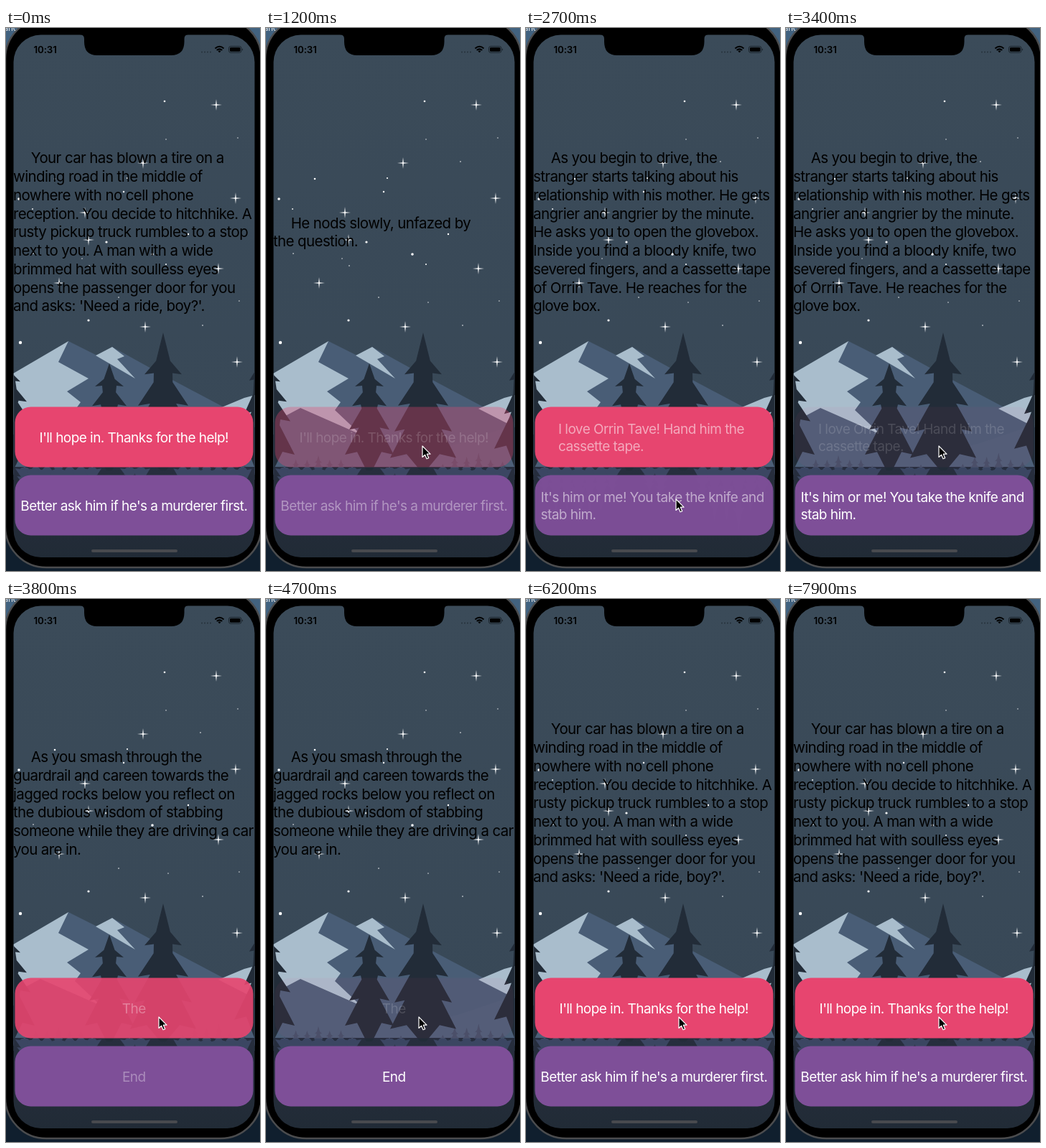
These frames come from a looping animation (354x756 px, 8400 ms). An HTML page:

```html
<!DOCTYPE html>
<html lang="en">
<head>
<meta charset="utf-8">
<title>Hitchhike story</title>
<style>
  html, body { margin: 0; width: 100%; height: 100%; overflow: hidden; background: #101a26; }
  svg { display: block; width: 354px; height: 756px; }
  text { font-family: Inter, Roboto, sans-serif; font-optical-sizing: none; }
  .story { font-size: 20.5px; letter-spacing: -.61px; }
  .title { font-size: 19px; letter-spacing: -.55px; fill: #fff; }
</style>
</head>
<body>
<svg viewBox="0 0 354 756">
  <defs>
    <clipPath id="screen"><rect x="10.5" y="9.5" width="336" height="727.5" rx="38"/></clipPath>
    <linearGradient id="sky" x2="0" y2="1">
      <stop stop-color="#3b4b59"/><stop offset="1" stop-color="#384857"/>
    </linearGradient>
    <linearGradient id="lake" x2="0" y2="1">
      <stop stop-color="#272e3e"/><stop offset="1" stop-color="#212b36"/>
    </linearGradient>
  </defs>

  <rect width="354" height="756" fill="#101f2e"/>
  <rect width="354" height="40" fill="#42627f"/>
  <text x="-3" y="4" font-size="11" fill="#eee">anc</text>
  <rect x="-1" y="-14" width="357" height="765" rx="57" stroke="#4b4c4e" stroke-width="2.500"/>

  <g clip-path="url(#screen)">
    <rect x="10" y="9" width="338" height="620" fill="url(#sky)"/>
    <g id="stars" fill="#fff"></g>
    <path fill="#495d76" d="M87 436L137 461L148 444L215 481L300 526L347 552V620H10V500Z"/>
    <path fill="#a9bdcc" d="M10 481L87 436L73 465L115 488L85 506L104 521L96 532L132 566H10Z
      M125 456L148 444L165 457L155 461L180 488ZM296 530L332 515L347 511V556Z"/>
    <path fill="#4c5f78" d="M10 549L48 529L132 566L180 600L270 578L347 552V622H10Z"/>
    <rect x="10" y="611" width="338" height="128" fill="url(#lake)"/>
    <g id="grove" fill="#425068"></g>
    <g id="mirror" fill="#3b4662"></g>
    <g id="trees" fill="#222c38"></g>
    <g id="stories"></g>
    <g id="buttons"></g>
    <rect x="119" y="726" width="120" height="4" rx="2" fill="#484a4e"/>
  </g>

  <path d="M103 9Q109 9.500 109 15V19Q109 38 127 38H230Q248.500 38 248.500 19V15Q248.500 9.500 254 9Z"/>
  <text x="38.500" y="35" font-size="13.300" font-weight="600" letter-spacing="-.1">10:31</text>
  <g fill="#26313b">
    <circle cx="273" cy="33.500" r="1"/><circle cx="277" cy="33.500" r="1"/>
    <circle cx="281" cy="33.500" r="1"/><circle cx="285" cy="33.500" r="1"/>
  </g>
  <g fill="none" stroke="#000" stroke-width="2">
    <path d="M291.500 28.500Q297.500 23 303.500 28.500M293.800 31Q297.500 27.800 301.200 31"/>
    <path d="M296 32L297.500 34L299 32Z" stroke-width="1" fill="#000"/>
  </g>
  <rect x="310.500" y="25.500" width="17.500" height="8.800" rx="2.600" fill="none" stroke="#1b242c"/>
  <rect x="312" y="27" width="14.500" height="5.800" rx="1.400"/>
  <path d="M329.500 28.500Q331 30 329.500 31.500Z"/>

  <path id="cursor" d="M0 0V15.500L3.600 12.200L6 17.800L8.700 16.600L6.300 11.200H11Z"
    stroke="#fff" stroke-width="1.200" stroke-linejoin="round"/>
</svg>

<script>
const LOOP = 8400, STEP = 100;
const byId = id => document.getElementById(id);

function add(parent, tag, attrs, text) {
  const node = document.createElementNS("http://www.w3.org/2000/svg", tag);
  for (const key in attrs) node.setAttribute(key, attrs[key]);
  if (text) node.textContent = text;
  return parent.appendChild(node);
}

// Scenery
const sparkles = [[293,107],[191,188],[320,237],[110,257],[115,295],[296,335],[74,355],[194,416],[322,465]];
const dots = [[221,102,1.3],[223,155,.7],[323,153,.7],[271,186,.8],[68,210,1.3],[169,209,1.1],
  [18,238,1.8],[164,228,1.2],[37,252,.9],[140,298,1.6],[254,287,1.2],[38,314,.8],[106,321,.7],
  [116,331,.8],[204,315,1.8],[223,329,1],[157,375,.8],[226,382,.7],[325,380,.7],[115,407,1.6],
  [274,414,.8],[20,438,2.2]];
for (const [x, y] of sparkles)
  add(byId("stars"), "path", { d: `M${x} ${y - 8}l.8 7.200 7.200 .8-7.200 .8-.8 7.200-.8-7.200-7.200-.8 7.200-.8Z` });
for (const [cx, cy, r] of dots) add(byId("stars"), "circle", { cx, cy, r });

// Tiers are [bottom y, half width]; each tier tucks in before the next one.
function tree(parent, x, tip, tiers, foot = tiers[tiers.length - 1][0]) {
  const side = [];
  for (const [y, w] of tiers) {
    const rise = (y - tip) * .06;
    side.push([w * .38, y - (y - tip) * .34], [w, y - rise / 2], [w * .5, y - rise]);
  }
  side.push([4, foot]);
  const right = side.map(([w, y]) => `${x + w},${y}`);
  const left = side.map(([w, y]) => `${x - w},${y}`).reverse();
  add(parent, "polygon", { points: [`${x},${tip}`, ...right, ...left].join(" ") });
}

function conifer(parent, x, tip, height, w) {
  tree(parent, x, tip, [.4, .7, 1].map(k => [tip + height * k, w * (.4 + .6 * k)]));
}

// A clump of small trees on the shore and its taller image in the water.
function clump(from, to, count, depth) {
  for (let i = 0; i < count; i++) {
    const u = (i + .5) / count, x = from + (to - from) * u;
    const h = depth * (.45 + .55 * Math.sin(Math.PI * u)) * (i % 2 ? 1 : .82);
    conifer(byId("grove"), x, 622 - h * .34, h * .34, 8);
    conifer(byId("mirror"), x, 612 + h, -h, 13);
  }
}
clump(18, 128, 7, 80);
clump(164, 196, 2, 50);
clump(238, 338, 6, 92);

const trees = byId("trees");
tree(trees, 144, 467, [[500, 20], [528, 24], [562, 28], [598, 34]], 616);
tree(trees, 219, 424, [[484, 26], [529, 35], [566, 40], [604, 46]], 616);
tree(trees, 6, 466, [[493, 14], [522, 23], [550, 28], [598, 34]], 616);
tree(trees, 352, 450, [[492, 13], [540, 20], [590, 34]], 616);

// Story
const scenes = [
  { story: ["Your car has blown a tire on a", "winding road in the middle of",
      "nowhere with no cell phone", "reception. You decide to hitchhike. A",
      "rusty pickup truck rumbles to a stop", "next to you. A man with a wide",
      "brimmed hat with soulless eyes", "opens the passenger door for you",
      "and asks: 'Need a ride, boy?'."],
    titles: [["I'll hope in. Thanks for the help!"], ["Better ask him if he's a murderer first."]] },
  { story: ["He nods slowly, unfazed by", "the question."],
    titles: [["At least he's honest. I'll climb in."], ["Wait, I know how to change a tire."]] },
  { story: ["As you begin to drive, the", "stranger starts talking about his",
      "relationship with his mother. He gets", "angrier and angrier by the minute.",
      "He asks you to open the glovebox.", "Inside you find a bloody knife, two",
      "severed fingers, and a cassette tape", "of Orrin Tave. He reaches for the", "glove box."],
    titles: [["I love Orrin Tave! Hand him the", "cassette tape."],
      ["It's him or me! You take the knife and", "stab him."]] },
  { story: ["As you smash through the", "guardrail and careen towards the",
      "jagged rocks below you reflect on", "the dubious wisdom of stabbing",
      "someone while they are driving a car", "you are in."],
    titles: [["The"], ["End"]] }
];
const buttons = [
  { y: 527.5, color: "#e7456f", left: 45 },
  { y: 622.5, color: "#7e4f98", left: 20.5 }
];

for (const button of buttons) {
  button.plate = add(byId("buttons"), "rect",
    { x: 12.5, y: button.y, width: 332, height: 84, rx: 22, fill: button.color });
}

function lines(parent, list, middle, gap, place) {
  list.forEach((line, i) => add(parent, "text",
    { y: middle + (i - (list.length - 1) / 2) * gap, ...place(i) }, line));
}

for (const scene of scenes) {
  scene.text = add(byId("stories"), "g", { class: "story" });
  lines(scene.text, scene.story, 291.4, 25.75, i => ({ x: i ? 10 : 34.7 }));
  scene.labels = scene.titles.map((title, b) => {
    const label = add(byId("buttons"), "g", { class: "title" });
    const place = title.length > 1 ? { x: buttons[b].left } : { x: 178.3, "text-anchor": "middle" };
    lines(label, title, buttons[b].y + 49.5, 24, () => place);
    return label;
  });
}

// Timeline
const taps = [
  { button: 0, down: 500, up: 1140 },
  { button: 1, down: 2200, up: 2420 },
  { button: 0, down: 3400, up: 3590 },
  { button: 0, down: 4700, up: 4860 }
];
const route = [[100, 345, 730], [500, 218, 582], [1500, 218, 582], [2000, 209, 656],
  [2750, 209, 656], [3100, 213, 582], [LOOP, 213, 582]];

const clamp = v => Math.min(1, Math.max(0, v));
const smooth = u => u * u * (3 - 2 * u);

function pointer(t) {
  const i = Math.max(1, route.findIndex(stop => stop[0] > t));
  const [t0, x0, y0] = route[i - 1], [t1, x1, y1] = route[i];
  const u = smooth(clamp((t - t0) / (t1 - t0)));
  return [x0 + (x1 - x0) * u, y0 + (y1 - y0) * u];
}

function plateAlpha(index, t) {
  const tap = taps.filter(p => p.button === index && p.down <= t).pop();
  if (!tap) return 1;
  return t < tap.up ? .05 : 1 - .95 * Math.exp(-(((t - tap.up) / 120) ** 1.5));
}

function draw(t) {
  const done = taps.filter(tap => tap.up <= t).length;
  const current = done % scenes.length;
  const since = done ? t - taps[done - 1].up : Infinity;
  const fadingOut = since < 100;
  const shown = fadingOut ? done - 1 : current;
  const fade = fadingOut ? 1 - since / 100 : 1 - (1 - clamp((since - 100) / 450)) ** 1.5;
  const plates = buttons.map((_, b) => plateAlpha(b, t));

  buttons.forEach((button, b) => button.plate.setAttribute("opacity", plates[b]));
  scenes.forEach((scene, s) => {
    scene.text.setAttribute("visibility", s === current ? "visible" : "hidden");
    scene.labels.forEach((label, b) =>
      label.setAttribute("opacity", s === shown ? fade * (.1 + .9 * plates[b]) : 0));
  });
  const [x, y] = pointer(t);
  byId("cursor").setAttribute("transform", `translate(${x} ${y})`);
  byId("cursor").setAttribute("visibility", t < 100 ? "hidden" : "visible");
}

const start = performance.now();
function tick() {
  const t = (performance.now() - start) % LOOP;
  draw(Math.floor(t / STEP) * STEP);
  requestAnimationFrame(tick);
}
tick();
</script>
</body>
</html>
```
